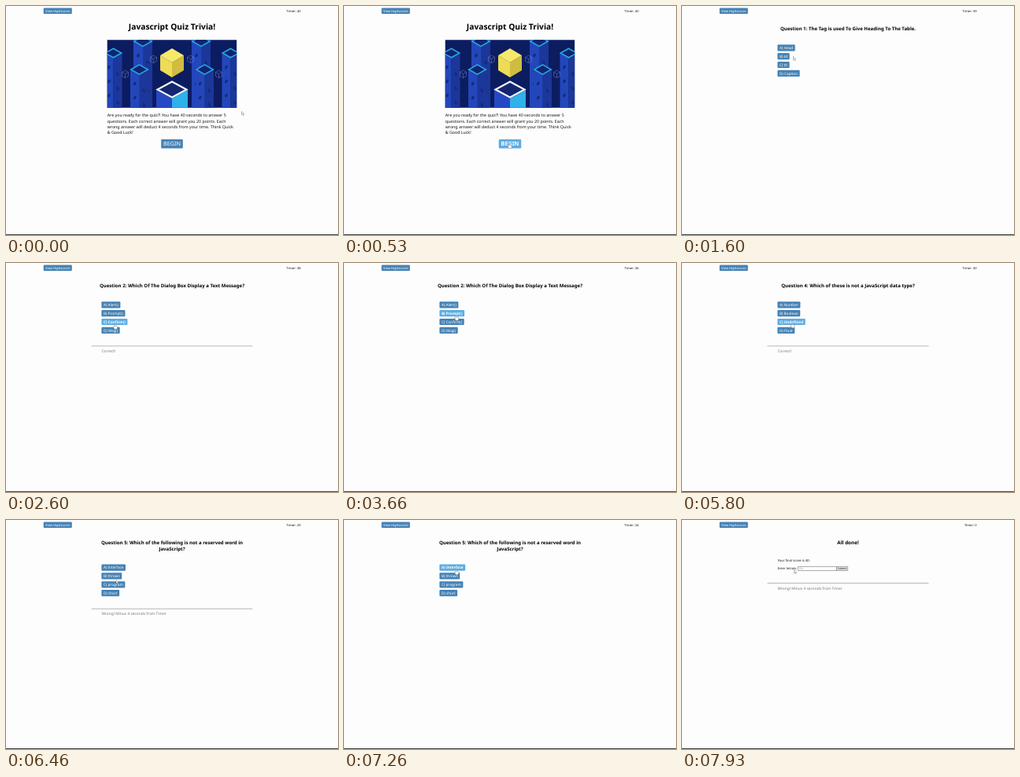
An HTML page that plays this animation: 422x292 px, repeating every 8 s.

```html
<!DOCTYPE html>
<html lang="en">
<head>
<meta charset="utf-8">
<title>Javascript Quiz Trivia</title>
<style>
  html, body { margin: 0; width: 100%; height: 100%; overflow: hidden; background: #fdfdfd; }
  svg { display: block; width: 422px; height: 292px; }
  text { font-family: "Noto Sans", "Open Sans", sans-serif; text-rendering: geometricPrecision; white-space: pre; }
</style>
</head>
<body>
<svg id="stage" viewBox="0 0 422 292">
  <rect width="422" height="292" fill="#fdfdfd"/>
  <g id="page"></g>
  <rect y="291" width="422" height="1" fill="#444"/>
  <g id="cursor"></g>
</svg>
<script>
const LOOP = 8000, CENTER = 211, LEFT = 121.4;
const TICK = 815, FIRST_TICK = 1200, NOTE_TIME = 1000;
const BLUE = '#4682b4', LIGHT = '#5dade2', INK = '#111';
const WRONG = 'Wrong! Minus 4 seconds from Timer', CORRECT = 'Correct!';
const page = document.getElementById('page');
const cursor = document.getElementById('cursor');
const ruler = document.createElement('canvas').getContext('2d');

// Each note is the verdict on the previous answer
const screens = [
  { at: 0, draw: intro },
  { at: 730, draw: question, title: ['Question 1: The Tag is used To Give Heading To The Table.'],
    options: ['Head', 'td', 'th', 'Caption'] },
  { at: 2200, draw: question, title: ['Question 2: Which Of The Dialog Box Display a Text Message?'],
    options: ['Alert()', 'Prompt()', 'Confirm()', 'Msg()'], note: CORRECT },
  { at: 3860, draw: question, title: ['Question 3: Inside which HTML element do we put the JavaScript?'],
    options: ['js', 'javaScript', 'script', 'scripting'], note: WRONG },
  { at: 5000, draw: question, title: ['Question 4: Which of these is not a JavaScript data type?'],
    options: ['Number', 'Boolean', 'Undefined', 'Float'], note: CORRECT },
  { at: 6200, draw: question, title: ['Question 5: Which of the following is not a reserved word in', 'JavaScript?'],
    options: ['Interface', 'throws', 'program', 'short'], note: WRONG },
  { at: 7930, draw: done, note: WRONG }
];

const home = [299.5, 134.5];
const moves = [
  { from: 60, to: 460, tip: [210, 175.5] },
  { from: 730, to: 1400, tip: [141.5, 64.5] },
  { from: 1600, to: 2060, tip: [136.5, 83] },
  { from: 2200, to: 3300, tip: [142.5, 67] },
  { from: 4000, to: 4660, tip: [140, 76.5] },
  { from: 6600, to: 7200, tip: [142.5, 63.5] }
];

function pointerAt(t) {
  return moves.reduce(([x, y], { from, to, tip }) => {
    const k = Math.min(1, Math.max(0, (t - from) / (to - from)));
    const e = k * k * (3 - 2 * k);
    return [x + (tip[0] - x) * e, y + (tip[1] - y) * e];
  }, home);
}

// Penalties show at the tick after a wrong answer
function secondsLeft(t, screen) {
  if (screen.draw === done) return 0;
  const count = Math.max(0, Math.floor((t - FIRST_TICK) / TICK) + 1);
  const lastTick = FIRST_TICK + (count - 1) * TICK;
  return 40 - count - 4 * screens.filter(s => s.note === WRONG && s.at <= lastTick).length;
}

function textWidth(str, size, weight) {
  ruler.font = `${weight} 100px "Noto Sans", "Open Sans", sans-serif`;
  return ruler.measureText(str).width * size / 100;
}

const text = (x, y, size, str, { fill = INK, weight = 400, anchor = 'start' } = {}) =>
  `<text x="${x}" y="${y}" font-size="${size}" fill="${fill}" font-weight="${weight}" text-anchor="${anchor}">${str}</text>`;
const heading = (y, size, str) => text(CENTER, y, size, str, { fill: '#000', weight: 700, anchor: 'middle' });
const rect = (x, y, w, h, fill, extra = '') =>
  `<rect x="${x}" y="${y}" width="${w}" height="${h}" fill="${fill}" ${extra}/>`;
const poly = (points, fill, extra = '') => `<polygon points="${points}" fill="${fill}" ${extra}/>`;
const diamond = (x, y, w, h, fill, extra) =>
  poly(`${x},${y - h} ${x + w},${y} ${x},${y + h} ${x - w},${y}`, fill, extra);

// The two visible walls of a block whose top is a diamond
const walls = (x, y, w, h, depth, left, right) =>
  poly(`${x - w},${y} ${x},${y + h} ${x},${y + h + depth} ${x - w},${y + depth}`, left) +
  poly(`${x + w},${y} ${x},${y + h} ${x},${y + h + depth} ${x + w},${y + depth}`, right);

// A button whose label turns bold and box turns light under the pointer
function button(x, cy, h, size, label, pad, pointer, centered) {
  const box = weight => {
    const w = textWidth(label, size, weight) + 2 * pad;
    return { w, left: centered ? x - w / 2 : x };
  };
  const rest = box(500);
  const over = pointer[0] > rest.left && pointer[0] < rest.left + rest.w && Math.abs(pointer[1] - cy) < h / 2;
  const weight = over ? 700 : 500, { w, left } = box(weight);
  const svg = rect(left, cy - h / 2, w, h, over ? LIGHT : BLUE, 'rx="1"') +
    text(left + pad, cy + size * 0.36, size, label, { fill: '#fff', weight });
  return { svg, over };
}

function pillar(x, y, w) {
  const h = w * 0.57;
  let svg = walls(x, y, w, h, 90, '#2347bb', '#1b3799') +
    diamond(x, y, w - 0.7, h - 0.5, '#10256f', 'stroke="#28a9e6" stroke-width="1.5"');
  for (let i = 0; i < 6; i++) {
    const side = i % 2 ? 1 : -1, lx = x + side * w / 2, ly = y + 18 + i * 9;
    svg += `<ellipse cx="${lx}" cy="${ly}" rx="1.7" ry="2.5" fill="#152b80" transform="rotate(${-side * 30} ${lx} ${ly})"/>`;
  }
  return svg;
}

const wireCube = (x, y) =>
  `<path d="M${x} ${y - 5}l4 2.3v5l-4 2.4l-4 -2.4v-5zm-4 2.3l4 2.3l4 -2.3m-4 2.3v5.1" fill="none" stroke="#7d92d2" stroke-width=".45"/>`;

const mirrored = (shape, dx, ...rest) => shape(CENTER - dx, ...rest) + shape(CENTER + dx, ...rest);

const illustration =
  '<clipPath id="frame"><rect x="128.7" y="43.3" width="164.5" height="86.4"/></clipPath><g clip-path="url(#frame)">' +
  rect(128, 43, 166, 87, '#0c1c60') +
  mirrored(pillar, 37, 45, 12) + mirrored(pillar, 74.5, 60, 11) + mirrored(pillar, 41.5, 81, 11.5) +
  walls(CENTER, 107, 20, 11, 30, '#2549c4', '#2fb1ea') +
  diamond(CENTER, 106.5, 18.5, 10, '#13266f', 'stroke="#f3f5fb" stroke-width="2.2"') +
  walls(CENTER, 63, 15, 9, 19, '#eedb56', '#d0bc40') +
  diamond(CENTER, 63, 15, 9, '#f7e96a') +
  mirrored(wireCube, 23.5, 68) + mirrored(wireCube, 59.5, 87) +
  '</g>';

const introLines = ['Are you ready for the quiz?! You have 40 seconds to answer 5',
  'questions. Each correct answer will grant you 20 points. Each',
  'wrong answer will deduct 4 seconds from your time. Think Quick', '&amp; Good Luck!'];

function intro(screen, pointer) {
  const begin = button(CENTER, 175.7, 11.6, 7.25, 'BEGIN', 2.8, pointer, true);
  return {
    svg: heading(30.1, 10.25, 'Javascript Quiz Trivia!') + illustration +
      introLines.map((line, i) => text(128.7, 141.3 + i * 7.2, 5.29, line)).join('') + begin.svg,
    over: begin.over
  };
}

function question({ title, options }, pointer) {
  const shift = (title.length - 1) * 7.3;
  const buttons = options.map((label, i) =>
    button(LEFT, 53.3 + shift + i * 10.85, 8.2, 4.7, `${'ABCD'[i]}) ${label}`, 2.5, pointer));
  return {
    svg: title.map((line, i) => heading(31.3 + i * 7.4, 6.07, line)).join('') + buttons.map(b => b.svg).join(''),
    over: buttons.some(b => b.over),
    noteY: 105.9 + shift
  };
}

function done() {
  const border = 'stroke="#777" stroke-width=".6"';
  return {
    svg: heading(31.3, 6.3, 'All done!') +
      text(LEFT, 53.2, 4.2, 'Your final score is 40.') + text(LEFT, 63.4, 4, 'Enter Initials:') +
      rect(147.5, 59.7, 49, 4.7, '#fff', border) + text(148.5, 63.2, 3, 'TFG', { fill: '#888' }) +
      rect(196.6, 59.7, 14.2, 4.7, '#e6e6e6', border) + text(203.7, 63.3, 3.5, 'Submit', { anchor: 'middle' }),
    over: false,
    noteY: 80.5
  };
}

function pointerShape([x, y], hand) {
  const d = hand
    ? 'M-.5 0q.8 -.6 1.1 .3v1.8l2.2 .6q.7 .3 .5 1.2l-.6 2.3h-3l-1.8 -2.6q.1 -.8 1.1 -.2z'
    : 'M0 0v4.4l1 -.9l.8 1.6l.8 -.4l-.8 -1.5h1.4z';
  return `<path d="${d}" transform="translate(${x} ${y})" fill="#fff" stroke="#666" stroke-width=".45"/>`;
}

let drawn = '';
function render(t) {
  const pointer = pointerAt(t);
  const screen = screens.findLast(s => s.at <= t);
  const view = screen.draw(screen, pointer);
  let svg = button(47.7, 6.3, 7.4, 4.1, 'View Highscores', 2.3, pointer).svg +
    text(374.6, 7.9, 4.1, `Timer: ${secondsLeft(t, screen)}`, { anchor: 'end' }) + view.svg;
  if (screen.note && t < screen.at + NOTE_TIME) {
    svg += rect(108.5, view.noteY - 0.4, 205, 0.8, '#a5a5a5') +
      text(LEFT, view.noteY + 8, 4.85, screen.note, { fill: '#777' });
  }
  if (svg !== drawn) page.innerHTML = drawn = svg;
  cursor.innerHTML = pointerShape(pointer, view.over);
}

let start;
function frame(now) {
  start ??= now;
  render((now - start) % LOOP);
  requestAnimationFrame(frame);
}
render(0);
requestAnimationFrame(frame);
</script>
</body>
</html>
```
